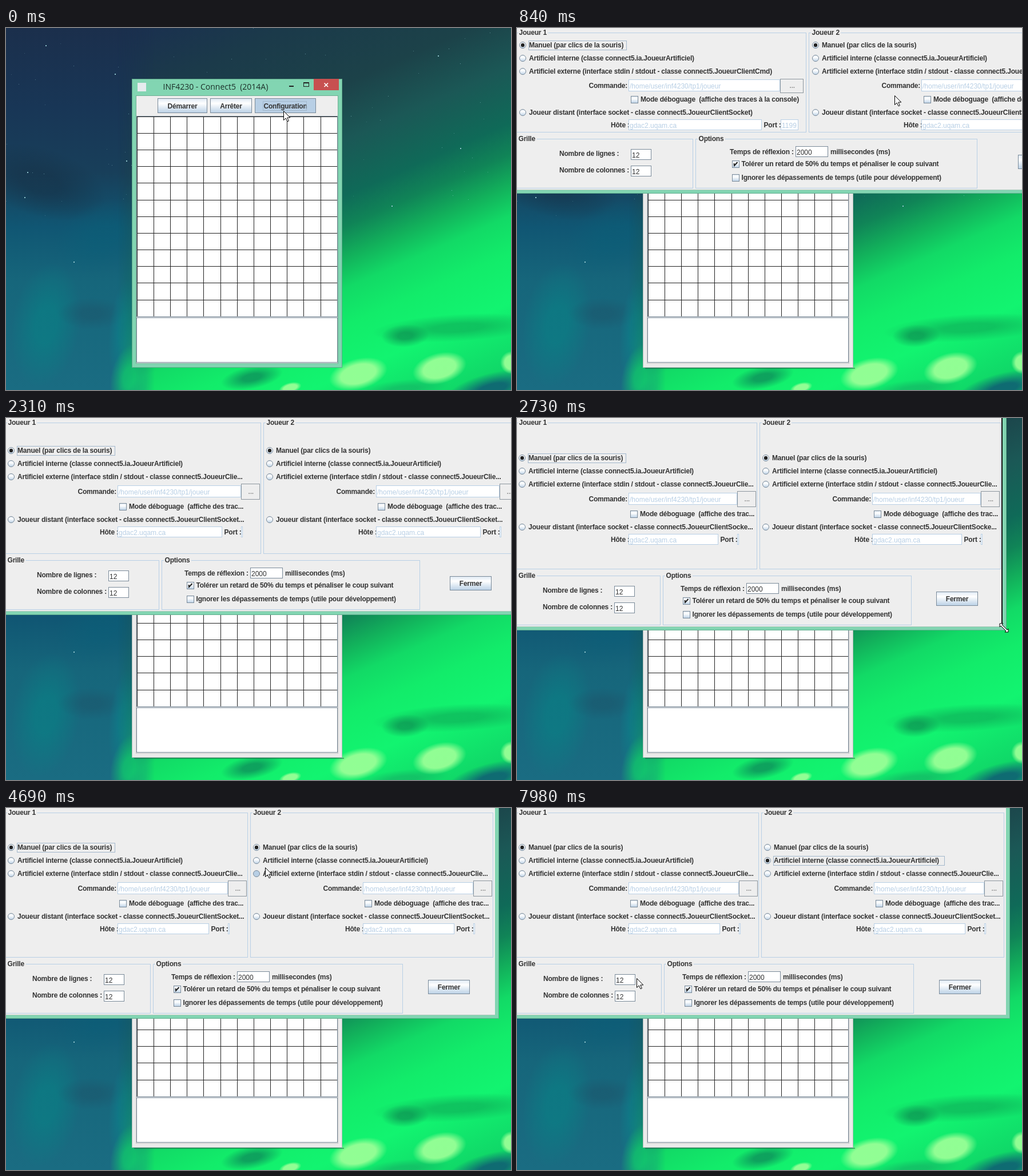
Write an HTML page with a canvas that moves like this. It is 883 px wide and 634 px high and loops after 8000 ms.

```html
<!DOCTYPE html>
<html lang="fr">
<head>
<meta charset="utf-8">
<title>Connect5</title>
<style>
html, body { margin: 0; width: 100%; height: 100%; overflow: hidden; background: #1a3050; }
#screen { position: relative; width: 883px; height: 634px; overflow: hidden; perspective: 4200px; perspective-origin: 510px 60px; }
canvas { position: absolute; left: 0; top: 0; }
#dialog { left: -20px; top: -40px; transform-origin: 530px 170px; }
</style>
</head>
<body>
<div id="screen">
  <canvas id="desktop" width="883" height="634"></canvas>
  <canvas id="dialog" width="1060" height="440"></canvas>
  <canvas id="pointer" width="883" height="634"></canvas>
</div>
<script>
const W = 883, H = 634, LOOP = 8000, TICK = 70;
const BOLD = 'bold 12px "Liberation Sans", Arial, sans-serif';
const PLAIN = '12px "Liberation Sans", Arial, sans-serif';
const TITLE = '14px "Open Sans", sans-serif';
const INK = '#333', PALE = '#b8cfe5', EDGE = '#7a8a99', PANEL = '#eee', GREEN = '#82d5b2';

const context = id => document.getElementById(id).getContext('2d');
const desktop = context('desktop'), sheet = context('dialog'), top_ = context('pointer');
sheet.translate(20, 40);
let g = desktop;

const layer = () => {
  const c = document.createElement('canvas');
  c.width = W; c.height = H;
  return c.getContext('2d');
};

// Time tables: [ms, x, y]
const POINTER = [
  [0, 485, 145], [350, 495, 188], [490, 510, 194], [840, 660, 118], [910, 861, 9], [980, 950, -60],
  [2940, 950, -60], [2941, 855, 362], [3570, 55, 51], [3710, 55, 51], [4200, 70, 79], [4270, 70, 79],
  [4690, 453, 104], [5110, 568, 95], [5810, 708, 81], [5880, 708, 81], [6300, 575, 104],
  [6650, 505, 84], [6930, 505, 84], [7350, 401, 234], [7420, 401, 234], [7980, 209, 298]
];
const CORNER = [
  [0, 1028, 290], [1960, 1028, 290], [2450, 858, 367], [2520, 858, 367],
  [2730, 856, 372], [2870, 862, 369], [LOOP, 862, 369]
];

function at(table, t) {
  const i = table.findIndex(k => k[0] > t);
  if (i < 0) return table[table.length - 1].slice(1);
  const [t0, x0, y0] = table[i - 1], [t1, x1, y1] = table[i], p = (t - t0) / (t1 - t0);
  return [Math.round(x0 + (x1 - x0) * p), Math.round(y0 + (y1 - y0) * p)];
}

function rect(x, y, w, h, fill) { g.fillStyle = fill; g.fillRect(x, y, w, h); }

function frame(x, y, w, h, color) {
  g.strokeStyle = color; g.lineWidth = 1;
  g.strokeRect(x + .5, y + .5, w - 1, h - 1);
}

function box(x, y, w, h, fill, edge) { rect(x, y, w, h, fill); frame(x, y, w, h, edge); }

// Text is placed by its left edge and the middle of its line.
function text(s, x, y, color = INK, font = BOLD) {
  g.font = font; g.fillStyle = color;
  g.letterSpacing = font === BOLD ? '-0.2px' : '0px';
  g.fillText(s, x, y + 4);
  return g.measureText(s).width;
}

function shine(y, h) {
  return ramp(0, y, 0, y + h, [[0, '#dde8f3'], [.35, '#fff'], [1, PALE]]);
}

function button(label, x, y, w, h, pressed) {
  box(x, y, w, h, pressed ? PALE : shine(y, h), EDGE);
  g.textAlign = 'center';
  text(label, x + w / 2, y + h / 2 + .5);
  g.textAlign = 'left';
}

function radio(x, y, on, hover) {
  g.beginPath(); g.arc(x, y, 5.5, 0, 7);
  g.fillStyle = hover ? PALE : shine(y - 6, 12); g.fill();
  g.strokeStyle = EDGE; g.lineWidth = 1; g.stroke();
  if (!on) return;
  g.beginPath(); g.arc(x, y, 3.2, 0, 7); g.fillStyle = '#222'; g.fill();
}

function checkbox(x, y, on) {
  box(x - 6, y - 6, 13, 13, shine(y - 6, 13), EDGE);
  if (!on) return;
  g.beginPath(); g.moveTo(x - 2.5, y - 1); g.lineTo(x - 2, y + 3); g.lineTo(x + 3.5, y - 3);
  g.strokeStyle = '#222'; g.lineWidth = 2; g.stroke();
}

function field(s, x, y, w, h, enabled) {
  box(x, y, w, h, '#fff', enabled ? EDGE : PALE);
  if (s) text(s, x + 2, y + h / 2 + 1, enabled ? INK : PALE, PLAIN);
}

function titled(label, x, y, w, h) {
  frame(x, y, w, h, PALE);
  g.font = BOLD; g.letterSpacing = '-0.2px';
  rect(x + 4, y - 1, g.measureText(label).width + 4, 3, PANEL);
  text(label, x + 5.5, y);
}

function ramp(x0, y0, x1, y1, colors) {
  const s = g.createLinearGradient(x0, y0, x1, y1);
  for (const [p, c] of colors) s.addColorStop(p, c);
  return s;
}

// Soft ellipse; `core` is the share of the radius that stays solid.
function glow(x, y, rx, ry, turn, rgb, alpha, core = .3) {
  g.save();
  g.translate(x, y); g.rotate(turn); g.scale(rx, ry);
  const s = g.createRadialGradient(0, 0, core, 0, 0, 1);
  s.addColorStop(0, `rgba(${rgb},${alpha})`);
  s.addColorStop(1, `rgba(${rgb},0)`);
  g.fillStyle = s; g.fillRect(-1, -1, 2, 2);
  g.restore();
}

function paintSky() {
  const sky = layer(), aurora = layer();
  g = aurora;
  // The bands climb to the right, across the direction (.4, .91).
  rect(0, 0, W, H, ramp(0, 0, 400, 910, [
    [.08, '#1a2f50'], [.2, '#1b3a4a'], [.33, '#1c4249'], [.42, '#1b5856'], [.51, '#0f6a58'],
    [.56, '#108457'], [.61, '#12b05b'], [.66, '#12da66'], [.72, '#12ec6a'], [.8, '#12f470'], [.9, '#10d868']
  ]));
  glow(790, 525, 150, 24, -.06, '14,180,90', .75);
  glow(698, 539, 42, 20, -.05, '12,145,82', .7);
  glow(430, 612, 55, 20, -.2, '12,130,88', .7);
  glow(695, 632, 80, 16, -.1, '20,175,100', .6);
  glow(850, 632, 85, 28, -.25, '15,95,115', .9);
  for (const [x, y, rx, ry] of [[616, 606, 52, 27], [758, 596, 48, 27], [884, 586, 20, 20], [497, 630, 20, 9]])
    glow(x, y, rx, ry, -.25, '152,255,150', .95, .6);
  g.globalCompositeOperation = 'destination-in';
  rect(0, 0, W, H, ramp(195, 0, 260, 0, [[0, 'rgba(0,0,0,0)'], [1, '#000']]));

  g = sky;
  rect(0, 0, W, H, ramp(0, 0, 0, H, [
    [0, '#1b2f4c'], [.22, '#183656'], [.4, '#183f5a'], [.55, '#105673'], [.7, '#16667b'], [1, '#1a6c82']
  ]));
  glow(60, 270, 120, 60, .3, '22,50,72', .6);
  glow(170, 365, 90, 60, -.4, '10,95,120', .5);
  glow(70, 520, 60, 110, .15, '8,130,134', .6);
  glow(150, 500, 60, 28, 0, '28,84,106', .5);
  glow(205, 530, 25, 90, .1, '12,130,140', .6);
  glow(215, 612, 32, 60, .2, '18,185,115', .9);
  g.drawImage(aurora.canvas, 0, 0);

  let seed = 7;
  const random = () => (seed = seed * 16807 % 2147483647) / 2147483647;
  for (let i = 0; i < 75; i++)
    rect(random() * W | 0, random() * 330 | 0, 1, 1, `rgba(150,205,215,${.2 + random() * .4})`);
  for (const [x, y] of [[190, 80], [69, 30], [37, 252], [794, 210], [674, 311], [118, 409], [32, 296], [210, 232], [755, 48]])
    rect(x, y, 2, 2, '#8fc4cc');
  return sky.canvas;
}

function mainWindow(active, pressed) {
  box(220, 89, 368, 506, active ? GREEN : '#ebebeb', active ? '#5fa98a' : '#b5bdbb');
  if (!active) rect(224, 595, 367, 2, 'rgba(40,70,70,.45)');
  rect(230, 96, 15, 15, '#e6ebee');
  text('INF4230 - Connect5  (2014A)', 274.5, 104, active ? '#1c3029' : '#888', TITLE);
  rect(538, 89, 44, 20, active ? '#c75050' : '#bcbcbc');
  rect(495, 101, 8, 2, '#222');
  frame(520, 95, 10, 8, '#222'); rect(520, 95, 10, 2, '#222');
  g.beginPath();
  g.moveTo(556.5, 96.5); g.lineTo(563, 103); g.moveTo(563, 96.5); g.lineTo(556.5, 103);
  g.strokeStyle = '#fff'; g.lineWidth = 1.7; g.stroke();

  box(227, 118, 354, 470, PANEL, active ? '#6fae94' : '#c4c4c4');
  button('Démarrer', 265, 123, 87, 26);
  button('Arrêter', 357, 123, 73, 26);
  button('Configuration', 435, 123, 107, 26, pressed);
  frame(449, 128, 77, 17, '#a3b8cc');

  box(228, 154, 352, 352, '#fff', EDGE);
  for (let i = 0; i < 12; i++) {
    const d = Math.floor(i * 175 / 6 + .25);
    rect(229, 155 + d, 350, 1, '#222');
    rect(229 + d, 155, 1, 350, '#222');
  }
  box(228, 507, 352, 79, '#fff', EDGE);
}

function player(n, x, w, bottom, state) {
  const wide = w >= 455, low = bottom < 195, shift = wide ? 1 : 0, right = x + w;
  const top = Math.round((9 + bottom) / 2 - (low ? 66 : 67)), extra = low ? 0 : 3;
  const rx = x + 11 + shift, tx = rx + 11, fx = x + 197;
  titled('Joueur ' + n, x, 8, w, bottom - 8);
  g.save();
  g.beginPath(); g.rect(x, 0, w, bottom); g.clip();

  const cut = s => wide ? s[0] : s[1];
  const options = [
    [0, 'Manuel (par clics de la souris)'],
    [23, 'Artificiel interne (classe connect5.ia.JoueurArtificiel)'],
    [46, 'Artificiel externe (interface stdin / stdout - classe connect5.' +
      cut(['JoueurClientCmd)', 'JoueurClie...'])],
    [118 + extra, 'Joueur distant (interface socket - classe connect5.' +
      cut(['JoueurClientSocket)', w < 424 ? 'JoueurClientSocke...' : 'JoueurClientSocket...'])]
  ];
  options.forEach(([dy, label], i) => {
    const y = top + dy, [mx, my] = state.pointer;
    const hover = mx > rx - 6 && mx < right - 8 && Math.abs(my - y) <= 11.5;
    radio(rx, y, state.choice[n - 1] === i, hover);
    const len = text(label, tx, y);
    if (state.focus === n * 10 + i) frame(tx - 1, y - 8, Math.round(len * 1.04), 17, '#a3b8cc');
  });

  const cy = top + 71 + extra / 3, hy = top + 140 + extra;
  const bw = wide ? 41 : 33, bh = low ? 25 : 28, bx = right - (wide ? 5 : 2) - bw;
  text('Commande:', x + 127.5, cy);
  field('/home/user/inf4230/tp1/joueur', fx, cy - 11, bx - fx, 21);
  box(bx, Math.round(cy - bh / 2), bw, bh, PANEL, '#8c969e');
  text('...', bx + bw / 2 - 4, cy, '#999');

  const dy = top + 95 + extra;
  checkbox(x + 206 + shift, dy);
  text('Mode déboguage  (affiche des ' + cut(['traces à la console)', 'trac...']), x + 217 + shift, dy);

  const hr = right - (wide ? 78 : 68);
  text('Hôte :', x + 166, hy);
  field('gdac2.uqam.ca', fx, hy - 10, hr - fx, 19);
  text('Port :', hr + 3.5, hy);
  field(wide ? '1199' : '', hr + 33, hy - 10, wide ? 31 : 3, 19);
  g.restore();
}

function dialog(t, state) {
  const [outer, B] = at(CORNER, t), R = outer - 7;
  rect(-13, -38, outer + 13, B + 38, GREEN);
  rect(-13, B - 1, outer + 13, 1, '#5fae8e');
  rect(outer - 1, -38, 1, B + 38, '#5fae8e');
  rect(-6, -10, R + 6, B + 3, PANEL);
  rect(-6, B - 7, R + 6, 1, '#a9c9ba');
  if (t > 1960 && t < 2870) rect(R - 2, -10, 2, B + 3, '#111');

  const w = Math.floor((R - 4) / 2), second = w + 2;
  player(1, -2, w, B - 107, state);
  player(2, second, w, B - 107, state);

  const split = Math.round(R / 3 - 32), top = B - 96;
  titled('Grille', -3, top, split + 3, 87);
  const gx = Math.round(R / 6 - 96.5);
  ['Nombre de lignes :', 'Nombre de colonnes :'].forEach((s, i) => {
    text(s, gx, B - 70 + i * 29);
    field('12', gx + 125, B - 78 + i * 29, 36, 19, true);
  });

  titled('Options', split + 4, top, Math.round(R * 2 / 3 + 124) - split - 4, 87);
  const ox = Math.round(R / 2 - 138.5);
  text('Temps de réflexion :', ox, B - 73);
  field('2000', ox + 115, B - 83, 57, 19, true);
  text('millisecondes (ms)', ox + 176, B - 73);
  checkbox(ox + 10, B - 52, true);
  text('Tolérer un retard de 50% du temps et pénaliser le coup suivant', ox + 20.5, B - 52);
  checkbox(ox + 10, B - 28);
  text('Ignorer les dépassements de temps (utile pour développement)', ox + 20.5, B - 28);
  button('Fermer', Math.round(R * 5 / 6 + 25.5), B - 68, 73, 25);
}

function shape(points, x, y) {
  g.beginPath();
  for (const [dx, dy] of points) g.lineTo(x + dx, y + dy);
  g.closePath();
  g.fillStyle = '#fff'; g.fill();
  g.strokeStyle = '#000'; g.lineWidth = 1; g.stroke();
}

const ARROW = [[.5, .5], [.5, 16.5], [4.2, 13], [7, 18.8], [9.4, 17.8], [6.8, 12], [11.8, 12]];
const SIZER = [
  [-7.5, -7.5], [-1.5, -7.5], [-3.5, -5.5], [5.5, 3.5], [7.5, 1.5],
  [7.5, 7.5], [1.5, 7.5], [3.5, 5.5], [-5.5, -3.5], [-7.5, -1.5]
];

const sky = paintSky();

function draw(t) {
  const state = {
    pointer: at(POINTER, t),
    choice: [0, t >= 6860 ? 1 : 0],
    focus: t >= 6720 ? 21 : 10
  };

  g = desktop;
  g.drawImage(sky, 0, 0);
  mainWindow(t < 210, t < TICK);

  // The dialog tilts up towards the viewer while it fades in.
  const p = Math.min(1, Math.max(0, (t - 210) / 280)), rest = (1 - p) ** 3;
  g = sheet;
  g.clearRect(-20, -40, 1060, 440);
  dialog(t, state);
  g.canvas.style.opacity = 1 - rest;
  g.canvas.style.transform = rest ? `translateZ(${-336 * rest}px) rotateX(${-54 * rest}deg)` : 'none';

  g = top_;
  g.clearRect(0, 0, W, H);
  if (t > 1960 && t <= 2940) {
    const [x, y] = at(CORNER, t);
    shape(SIZER, x - 4.5, y - 4.5);
  } else {
    shape(ARROW, ...state.pointer);
  }
}

const start = performance.now();
function tick() {
  const t = (performance.now() - start) % LOOP;
  draw(Math.floor(t / TICK) * TICK);
  requestAnimationFrame(tick);
}
tick();
</script>
</body>
</html>
```
